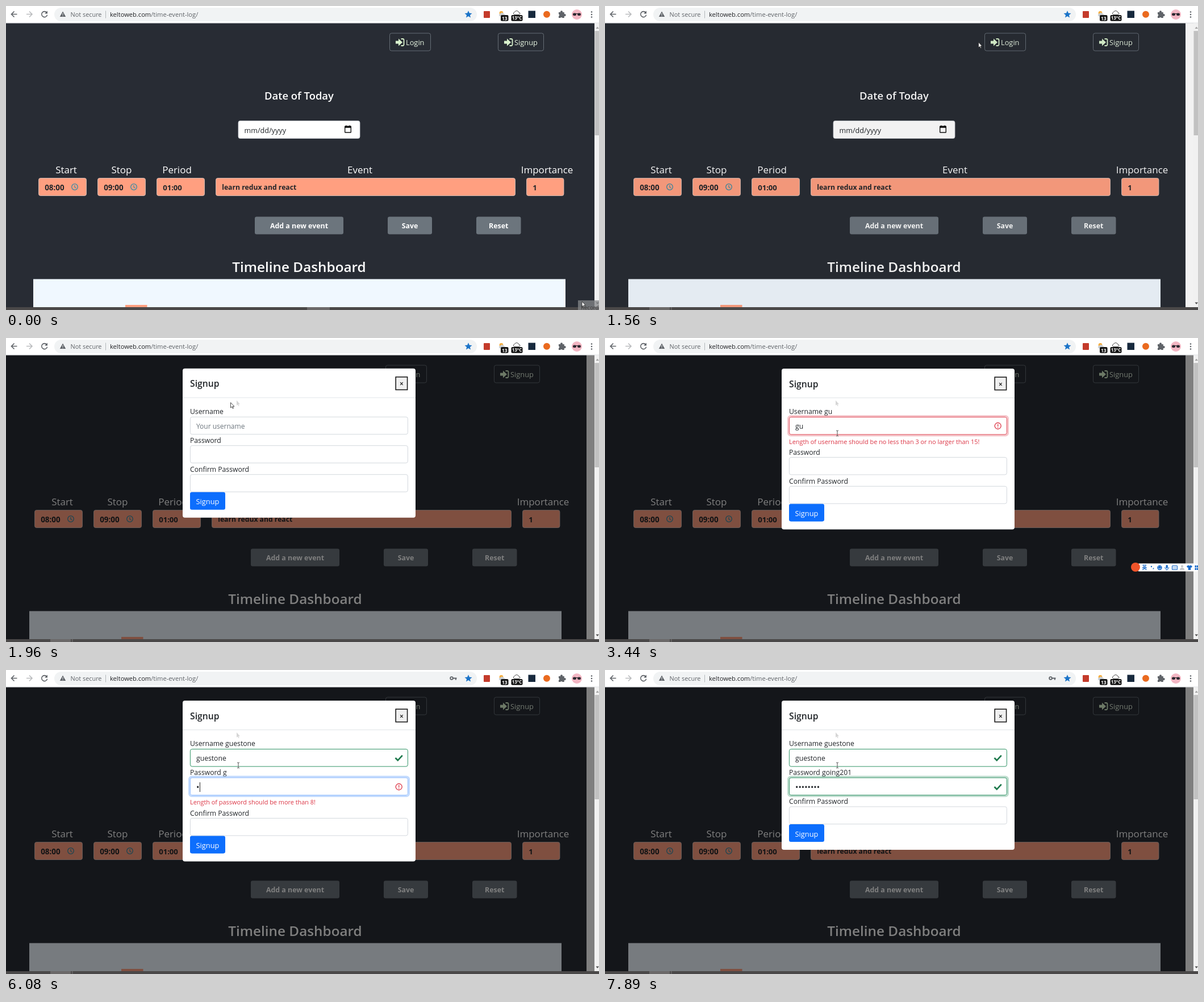
These frames come from a looping animation (1044x536 px, 8000 ms). An HTML page:

```html
<!DOCTYPE html>
<html lang="en">
<head>
<meta charset="utf-8">
<title>Time event log signup</title>
<style>
  html, body { margin: 0; width: 100%; height: 100%; overflow: hidden; background: #fff; }
  svg { display: block; font-family: "Open Sans", "Noto Sans", "Noto Sans CJK SC", sans-serif; white-space: pre; }
</style>
</head>
<body>
<svg width="1044" height="536" viewBox="0 0 1044 536">
  <rect id="sheet" y="30" width="1036" height="501" fill="#282c34"/>
  <g id="page"></g>
  <rect id="backdrop" y="30" width="1036" height="501"/>
  <g id="modal"></g>
  <g id="frame"></g>
  <g id="overlay"></g>
</svg>
<script>
const LOOP = 8000;
const OPEN = 1541, SLIDE = 1673, FOCUS_USER = 2360, FOCUS_PASS = 5430;
const USER = 'guestone', USER_KEYS = [2720, 2920, 3710, 3850, 4240, 4380, 4510, 4640];
const PASS = 'going201', PASS_KEYS = [6080, 6210, 6340, 6610, 6760, 7100, 7300, 7360];

// red, green, blue, ring opacity
const NONE = [206, 212, 218, 0], BLUE = [134, 183, 254, .5], RED = [220, 53, 69, .28],
      GREEN = [25, 135, 84, .28], DONE = [25, 135, 84, 0];
const USER_LOOK = [[0, NONE], [FOCUS_USER, BLUE], [USER_KEYS[0], RED], [USER_KEYS[2], GREEN], [FOCUS_PASS, DONE]];
const PASS_LOOK = [[0, NONE], [FOCUS_PASS, BLUE], [PASS_KEYS[0], RED], [PASS_KEYS[7], GREEN]];

const POINTER = [
  [0, 1014, 521], [70, 1014, 521], [250, 1000, 420], [450, 955, 210], [680, 912, 79], [810, 902, 54],
  [880, 901, 55], [950, 902, 62], [1150, 902, 63], [1290, 902, 63], [1420, 848, 66], [1560, 653, 64],
  [1690, 430, 93], [1760, 417, 102], [1890, 406, 110], [1960, 395, 114], [2090, 394, 117], [2290, 409, 163]
];

const $ = id => document.getElementById(id);
const clamp = v => Math.max(0, Math.min(1, v));
const mix = (a, b, p) => a + (b - a) * p;
const ramp = (t, start, length = 150) => clamp((t - start) / length);

const rect = (x, y, w, h, fill, r = 0, more = '') =>
  `<rect x="${x}" y="${y}" width="${w}" height="${h}" rx="${r}" fill="${fill}" ${more}/>`;
const circle = (x, y, r, fill, more = '') => `<circle cx="${x}" cy="${y}" r="${r}" fill="${fill}" ${more}/>`;
const path = (d, fill, more = '') => `<path d="${d}" fill="${fill}" ${more}/>`;
const line = (d, color, width = 1.5, more = '') =>
  path(d, 'none', `stroke="${color}" stroke-width="${width}" ${more}`);
// y is the middle of the capitals
const text = (x, y, s, size, fill, weight = 400, anchor = 'start') =>
  `<text x="${x}" y="${y + size * .36}" font-size="${size}" fill="${fill}" font-weight="${weight}" text-anchor="${anchor}">${s}</text>`;
const at = (x, y, s) => `<g transform="translate(${x} ${y})">${s}</g>`;

const ruler = document.createElement('canvas').getContext('2d');
ruler.font = '12.2px "Open Sans", "Noto Sans", sans-serif';

function signIcon(x) {
  const color = '#d9f3cd';
  return at(x, 64, path('M0-2.6h5v-4l7 6.6-7 6.6v-4H0z', color) +
    line('M9.5-6h3a2 2 0 0 1 2 2v8a2 2 0 0 1-2 2h-3', color, 1.8));
}

const clock = x => at(x, 319, circle(0, 0, 5.3, 'none', 'stroke="#368ba5" stroke-width="1.3"') +
  line('M0-3.2V.4L2.4 2', '#368ba5', 1.2));

function buildPage() {
  const edge = 'stroke="#6c757d" stroke-width=".9"';
  let s = rect(675.5, 48, 72, 31, 'none', 3.3, edge) + signIcon(686) + text(704, 64, 'Login', 12.8, '#e6f4e1') +
    `<g id="hover">${rect(867, 48, 80, 31, '#6c757d', 3.3)}</g>` +
    rect(866.5, 48, 80, 31, 'none', 3.3, edge) + signIcon(877) + text(895, 64, 'Signup', 12.8, '#e6f4e1') +
    text(516, 158, 'Date of Today', 18.4, '#fff', 600, 'middle') +
    rect(409, 202.5, 214, 31, '#fff', 3.3, 'stroke="#ced4da" stroke-width=".8"') +
    text(419.5, 219, 'mm/dd/yyyy', 12.6, '#212529') +
    at(602, 217, rect(-5.3, -4.8, 10.6, 10.8, 'none', .8, 'stroke="#111" stroke-width="1.4"') +
      rect(-5.8, -5.4, 11.6, 3.2, '#111') + line('M-3.2-6.6v2M3.2-6.6v2', '#111'));
  for (const [x, label] of [[106, 'Start'], [203.5, 'Stop'], [301, 'Period'], [623, 'Event'], [952.5, 'Importance']])
    s += text(x, 289, label, 17, '#fff', 400, 'middle');
  for (const [x, w, value, size] of [[57.5, 84, '08:00', 13.4], [161.5, 84, '09:00', 13.4], [265.5, 84, '01:00', 13.1],
      [369.5, 527, 'learn redux and react', 12.2], [916.5, 65.5, '1', 13.1]])
    s += rect(x, 303.5, w, 31, '#ff9f80', 3.3, 'stroke="#dcc9c4" stroke-width=".8"') +
      text(x + 10.7, 320, value, size, '#212529', 700);
  s += clock(121) + clock(225);
  for (const [x, w, label] of [[438, 156, 'Add a new event'], [672, 78, 'Save'], [828, 78.5, 'Reset']])
    s += rect(x, 371.5, w, 31, '#6c757d', 3.3) + text(x + w / 2, 388, label, 12.4, '#fff', 700, 'middle');
  return s + text(516, 460.5, 'Timeline Dashboard', 24.3, '#fff', 600, 'middle') +
    rect(48, 481.5, 937, 50, '#f0f8ff') + rect(210, 527, 38.5, 4, '#ff9f80');
}

function buildFrame() {
  const grey = '#5f6368';
  let s = rect(0, 0, 1044, 30, '#fff') + rect(0, 29.5, 1044, 1, '#d5d8db') + rect(85, 3, 744, 24, '#f1f3f4', 12) +
    line('M19.5 14.5H9.5m5-5-5 5 5 5', grey, 1.6) + line('M36 14.5h10m-5-5 5 5-5 5', '#babcbe', 1.6) +
    line('M71.6 11.4a5 5 0 1 0 1 4.4', grey, 1.6) + path('M73 8.5v5h-5z', grey) +
    path('M100 9.5l5.2 9.5H94.8z', grey) + line('M100 12.7v3m0 1v1.2', '#f1f3f4', 1.1) +
    text(113.5, 15, 'Not secure', 10.9, grey) + rect(175, 8.5, 1, 13, '#b4b7ba') +
    text(183, 15, 'keltoweb.com<tspan fill="#5f6368">/time-event-log/</tspan>', 11.15, '#202124') +
    path('M814 8.3l1.8 4.3 4.7.4-3.6 3 1.1 4.6-4-2.5-4 2.5 1.1-4.6-3.6-3 4.7-.4z', '#1a73c8') +
    rect(841, 9, 11, 12, '#c43b2b', 1);
  // weather buttons
  s += circle(872, 12.5, 3.4, '#f5ad3c') + path('M869 18a2.5 2.5 0 0 1 1-4.5 4 4 0 0 1 7 1q3 .5 2 3.5z', '#c9ced3') +
    rect(871, 16, 13.5, 10.5, '#111', 2) + text(877.7, 21.5, '13', 8.4, '#fff', 700, 'middle') +
    path('M895 15.5a2.7 2.7 0 0 1 .6-5 4 4 0 0 1 7.2.6 2.3 2.3 0 0 1 .6 4.4z', '#fff', 'stroke="#444"') +
    rect(889.5, 16, 20, 10.5, '#111', 2) + text(899.5, 21.5, '13°C', 8, '#fff', 700, 'middle');
  s += rect(919.5, 8.5, 12.5, 12.5, '#17293d') + circle(952, 14.8, 6, '#ea6a1f') +
    path('M973 11h3.2a2 2 0 1 1 3.6 0h3v3.2a2 2 0 1 1 0 3.6V21h-3.3a1.9 1.9 0 0 0-3.4 0H973v-3.2a1.9 1.9 0 0 0 0-3.6z', grey) +
    circle(1005, 15, 9, '#f3b6c3') + rect(998, 12.5, 6, 4.5, '#2c2930', 2) + rect(1006, 12.5, 6, 4.5, '#2c2930', 2) +
    rect(1003, 13, 4, 1, '#2c2930');
  for (const y of [10.5, 15, 19.5]) s += circle(1031, y, 1.3, grey);
  return s + rect(1036, 30.5, 8, 501, '#f1f1f1') + rect(1036.5, 44, 8, 184, '#c1c1c1') +
    path('M1038.5 40l2.7-3.5 2.8 3.5z', '#a3a3a3') + path('M1038.5 522.5h5.5l-2.8 3.5z', '#505050') +
    rect(0, 531, 1044, 5, '#4a4848');
}

function buildInputBar() {
  const blue = '#1769c9';
  return rect(938, 397.5, 106, 14, '#fff', 2) + circle(934, 404, 8, '#f0542a') +
    text(945.5, 405, '英', 8.6, blue, 700) + circle(962, 403, 1.2, blue) + line('M966 405.5l-1 2', blue) +
    circle(976.5, 405, 4.2, blue) + line('M974 405.8q2.5 3 5 0M974.8 402.6v1.2M978.2 402.6v1.2', '#fff', 1) +
    rect(987.5, 400, 3.4, 6.2, blue, 1.7) + line('M985.7 404q0 4 3.5 4t3.5-4M989.2 408v2', blue, 1) +
    rect(998.5, 401.5, 9, 7, 'none', 1, `stroke="${blue}" stroke-width="1.2"`) + line('M1000 404h6m-6 2.4h6', blue, 1, 'stroke-dasharray="1.4 .9"') +
    circle(1016, 402.5, 2.1, '#c3c6ca') + path('M1012 409q0-4 4-4t4 4z', '#c3c6ca') +
    path('M1024 402.4l3-1.9q2 2 4 0l3 1.9-1.5 2.6-1.2-.6v4.6h-4.6v-4.6l-1.2.6z', blue) +
    [[1038.5, 401], [1042, 401], [1038.5, 405.5], [1042, 405.5]].map(([x, y]) => rect(x, y, 2.8, 3.5, blue)).join('');
}

const INPUT_BAR = buildInputBar();
const ARROW = path('M0 0v9.2l2.1-1.9 1.5 3.2 1.4-.6-1.5-3.1h2.9z', '#fff', 'stroke="#222" stroke-width=".8"');
const GHOST = path('M0 0v9l2-1.8 1.5 3 1.2-.5-1.4-3h2.7z', '#ccc', 'opacity=".8"');
const IBEAM = line('M-2 0q2 0 2 1.5 0-1.5 2-1.5M0 1.5v7M-2 10q2 0 2-1.5 0 1.5 2 1.5', '#555', 1);

function look(list, t) {
  const i = list.findLastIndex(k => k[0] <= t);
  const [start, to] = list[i], from = (list[i - 1] || list[i])[1];
  const [r, g, b, ring] = to.map((v, n) => mix(from[n], v, ramp(t, start)));
  return { color: `rgb(${r},${g},${b})`, ring };
}

function inputBox(y, { color, ring }) {
  return (ring ? rect(322.6, y - 1.9, 386.8, 34.3, 'none', 4.5, `stroke="${color}" stroke-opacity="${ring}" stroke-width="3.3"`) : '') +
    rect(324.4, y, 383, 30.6, '#fff', 3.3, `stroke="${color}" stroke-width=".9"`);
}

const tick = y => line(`M685.5 ${y}l4.3 4.3 8-8.6`, '#1f7a4d', 2.7);
const alarm = y => circle(691.7, y, 5.5, 'none', 'stroke="#dc3545" stroke-width="1.3"') +
  line(`M691.7 ${y - 3}v3.6m0 1.2v1.4`, '#dc3545', 1.4);
const mark = (count, valid, y) => count ? (valid ? tick(y) : alarm(y)) : '';
const typed = (word, keys, t) => word.slice(0, keys.filter(k => k <= t).length);

function buildModal(t) {
  const dark = '#212529', red = '#dc3545';
  const user = typed(USER, USER_KEYS, t), pass = typed(PASS, PASS_KEYS, t);
  const userOk = user.length > 2, passOk = pass.length > 7;
  const userGap = user && !userOk ? 20.4 : 0, passGap = pass && !passOk ? 20.4 : 0;
  const py = 190 + userGap, cy = 241 + userGap + passGap;
  const last = [FOCUS_USER, ...USER_KEYS, FOCUS_PASS, ...PASS_KEYS].filter(k => k <= t).pop();
  const caretOn = last && Math.floor((t - last) / 520) % 2 === 0;
  const caret = t < FOCUS_PASS ? [335.5 + ruler.measureText(user).width, 147] : [335.5 + 5.4 * pass.length, py + 8];

  let s = rect(311, 54, 410, cy + 76 - 54, '#fff', 4) + text(324, 81, 'Signup', 15.7, dark, 600) +
    rect(311, 105, 410, .9, '#dee2e6') +
    rect(686.2, 69, 20.4, 22.6, '#efefef', 0, 'stroke="#1c1c1c" stroke-width="1.6"') +
    text(696.4, 81.3, '×', 12, '#111', 600, 'middle') +
    text(324, 130, 'Username ' + user, 12.2, dark) + inputBox(139.5, look(USER_LOOK, t)) +
    (user ? text(335, 156, user, 12.2, dark) : text(335, 156, 'Your username', 12, '#6c757d')) +
    mark(user, userOk, 155);
  if (userGap) s += text(324, 183, 'Length of username should be no less than 3 or no larger than 15!', 10.9, red);
  s += text(324, py - 9, 'Password ' + pass, 12.2, dark) + inputBox(py, look(PASS_LOOK, t)) +
    text(335, py + 17.3, '•'.repeat(pass.length), 14.3, dark) + mark(pass, passOk, py + 16);
  if (passGap) s += text(324, py + 43.5, 'Length of password should be more than 8!', 10.9, red);
  s += text(324, cy - 9, 'Confirm Password', 12.2, dark) + inputBox(cy, look([[0, NONE]], t)) +
    rect(324, cy + 31, 62, 31, '#0d6efd', 3.3) + text(355, cy + 48, 'Signup', 12.8, '#fff', 400, 'middle');
  if (caretOn) s += rect(caret[0], caret[1], 1, 17, '#222');
  return s;
}

function pointerAt(t) {
  const i = POINTER.findIndex(k => k[0] > t);
  if (i < 0) return POINTER[POINTER.length - 1].slice(1);
  const a = POINTER[i - 1], b = POINTER[i], p = (t - a[0]) / (b[0] - a[0]);
  return [mix(a[1], b[1], p), mix(a[2], b[2], p)];
}

function buildOverlay(t, step) {
  const [x, y] = pointerAt(step);
  let s = step < OPEN ? rect(530, 531, 40, 5, '#6b6969') : rect(78, 531, 36, 5, '#6b6969') + rect(116, 531, 1.5, 5, '#6b6969');
  if (t < 140) s += rect(1007, 519, 37, 17, '#85878a', 0, 'opacity=".75"') + text(1012, 531.5, 'Record', 9.6, '#333');
  if (t >= FOCUS_USER && t < FOCUS_PASS) s += INPUT_BAR;
  if (t >= PASS_KEYS[0])
    s += circle(784.5, 14.5, 2.3, 'none', 'stroke="#5f6368" stroke-width="1.8"') + line('M787 14.5h6.5m-1.6 0v3', '#5f6368', 1.9);
  if (t >= 1950) s += at(406, 110, GHOST);
  return s + at(x, y, step >= 2260 ? IBEAM : ARROW);
}

function draw(t) {
  const beat = 1000 / 15, step = Math.max(0, 1290 + Math.floor((t - 1290) / beat + .01) * beat);
  const open = step >= OPEN;
  document.querySelector('#sheet').setAttribute('width', open ? 1022 : 1036);
  $('page').setAttribute('transform', `translate(${open ? -7 : 0} 0)`);
  $('hover').setAttribute('opacity', ramp(step, 680) - ramp(step, 1380));
  $('backdrop').setAttribute('opacity', ramp(step, OPEN) * .5);
  const slide = ramp(step, SLIDE, 300);
  $('modal').setAttribute('transform', `translate(0 ${-41 * (1 - slide) ** 1.7})`);
  $('modal').setAttribute('opacity', ramp(step, SLIDE));
  $('modal').innerHTML = step >= SLIDE ? buildModal(t) : '';
  $('overlay').innerHTML = buildOverlay(t, step);
}

$('page').innerHTML = buildPage();
$('frame').innerHTML = buildFrame();
const begin = performance.now();
function tickFrame() {
  draw((performance.now() - begin) % LOOP);
  requestAnimationFrame(tickFrame);
}
tickFrame();
</script>
</body>
</html>
```
